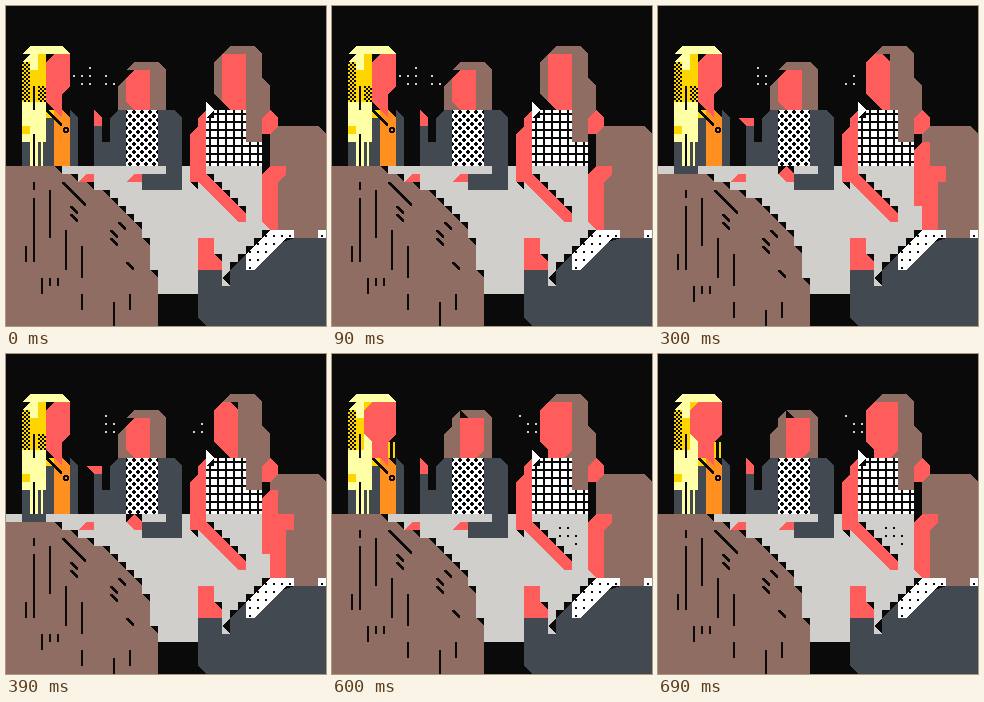
An HTML page that plays this animation: 320x320 px, repeating every 0.75 s.

```html
<!DOCTYPE html>
<html lang="en">
<head>
<meta charset="utf-8">
<title>Table talk</title>
<style>
  html, body { margin: 0; width: 100%; height: 100%; overflow: hidden; background: #0a0a0a; }
  svg { display: block; width: 100vw; height: 100vh; }
</style>
</head>
<body>
<svg id="stage" viewBox="0 0 320 320" shape-rendering="crispEdges">
  <defs>
    <pattern id="grid" width="8" height="8" patternUnits="userSpaceOnUse">
      <path fill="#fff" d="M0 0h8v8h-8z"/><path fill="#0a0a0a" d="M3 0h2v8h-2zM0 3h8v2h-8z"/>
    </pattern>
    <pattern id="lattice" width="8" height="8" patternUnits="userSpaceOnUse">
      <path fill="#fff" d="M0 0h8v8h-8z"/>
      <path fill="#0a0a0a" d="M3 4h2v1h1v2h-1v1h-2v-1h-1v-2h1zM0 0h1v1h1v2h-1v1h-1zM7 0h1v4h-1v-1h-1v-2h1z"/>
    </pattern>
    <pattern id="specks" width="8" height="8" patternUnits="userSpaceOnUse">
      <path fill="#fff" d="M0 0h8v8h-8z"/><path fill="#0a0a0a" d="M3 5h2v2h-2z"/>
    </pattern>
    <pattern id="check" width="4" height="4" patternUnits="userSpaceOnUse">
      <path fill="#ffd500" d="M0 0h4v4h-4z"/><path fill="#0a0a0a" d="M0 0h2v2h-2zM2 2h2v2h-2z"/>
    </pattern>
  </defs>
</svg>
<script>
const STEP = 150, STEPS = 5, T = 8;
const INK = '#0a0a0a', SKIN = '#ff5c5c', HAIR = '#8f6d62', TABLE = '#d0cfcb', COAT = '#434950',
      BLOND = '#ffffa6', GOLD = '#ffd500', ORANGE = '#ff9020', WHITE = '#fff';
const NS = 'http://www.w3.org/2000/svg';
const stage = document.getElementById('stage');
const parts = [];
let layer;

function add(fill, d) {
  const p = document.createElementNS(NS, 'path');
  p.setAttribute('fill', fill);
  p.setAttribute('d', d);
  layer.append(p);
}
// Starts a layer that is visible on the listed steps.
function on(steps, dy = 0) {
  layer = document.createElementNS(NS, 'g');
  if (dy) layer.setAttribute('transform', `translate(0 ${dy})`);
  stage.append(layer);
  parts.push([layer, steps]);
}
// Polygon in tile units: "x,y x,y ..."
const poly = (fill, pts) => add(fill, 'M' + pts.split(' ').map(p => p.split(',').map(n => n * T).join(' ')).join('L') + 'Z');
// Box in tile units with corners cut at 45 degrees: top left, top right, bottom right, bottom left.
const box = (fill, x, y, w, h, a = 0, b = 0, c = 0, d = 0) => poly(fill,
  `${x + a},${y} ${x + w - b},${y} ${x + w},${y + b} ${x + w},${y + h - c} ` +
  `${x + w - c},${y + h} ${x + d},${y + h} ${x},${y + h - d} ${x},${y + a}`);
// Half tile, upper right or upper left.
const wedge = (fill, x, y, left) => poly(fill, `${x},${y} ${x + 1},${y} ${left ? x : x + 1},${y + 1}`);
const strand = (x, y, n, fill = INK) => add(fill, `M${x * T + 3} ${y * T}h2v${n * T}h-2z`);
const slant = (x, y, n = 1) => add(INK,
  `M${x * T} ${y * T}h2l${n * T - 2} ${n * T - 2}v2h-2l${2 - n * T} ${2 - n * T}z`);
// A w by h block of specks, one in each tile.
function dots(fill, x, y, w = 1, h = 1) {
  for (let i = 0; i < w * h; i++)
    add(fill, `M${(x + i % w) * T + 3} ${(y + Math.floor(i / w)) * T + 5}h2v2h-2z`);
}
// One speck above two pairs; the pairs may drift sideways.
function puff(x, y, drift = 0) {
  dots(TABLE, x, y);
  dots(TABLE, x + drift, y + 1, 2, 2);
}

const ALL = '01234', REST = '0134', LEAN = '2', AWAY = '012', FRONT = '34';

on(ALL);
poly(TABLE, '0,20 33,20 33,28 27,34 28,35 24,36 19,36 0,36');

// Blonde woman
box(COAT, 2, 16, 7, 4);
box(COAT, 2, 20, 3, 1);
box(COAT, 8, 13, 1, 4, 0, 1);
box(COAT, 5, 13, 2, 3);
box(ORANGE, 6, 14, 2, 6);
poly(ORANGE, '6,13 7,13 8,14 6,14');
box(BLOND, 2, 5, 6, 1, 1, 1);
box(BLOND, 2, 6, 3, 11, 1);
box('url(#check)', 2, 7, 1, 5);
box(GOLD, 4, 6, 1, 4);
box(GOLD, 3, 8, 1, 4);
box(GOLD, 2, 15, 1, 1);
box(GOLD, 5, 13, 1, 1);
box(BLOND, 3, 12, 1, 8);
strand(3, 10, 3);
strand(3, 16, 4);
strand(4, 17, 3, BLOND);
on(AWAY);
box('url(#check)', 4, 10, 1, 2);
box(SKIN, 5, 6, 3, 5, 1, 0, 1);
box(SKIN, 5, 10, 2, 3, 0, 0, 0, 1);
on(FRONT);
box(SKIN, 4, 6, 4, 5, 1, 0, 1, 1);
box(SKIN, 5, 10, 2, 3);
for (const x of [55, 60]) add(GOLD, `M${x + 1} 88h2v16h-2z`);
on(ALL);
wedge(SKIN, 6, 13);
slant(5, 13, 2);
add(INK, 'M58 121h4v1h1v4h-1v1h-4v-1h-1v-4h1z');
add(ORANGE, 'M59 123h2v2h-2z');

// Middle woman
box(COAT, 13, 13, 2, 7, 1);
box(COAT, 11, 17, 2, 3);
box(COAT, 11, 15, 1, 2);
box(COAT, 19, 13, 1, 7);
box(COAT, 20, 13, 2, 10, 0, 1);
box(COAT, 17, 21, 3, 2);
box('url(#lattice)', 15, 13, 4, 7);
box(HAIR, 15, 7, 5, 6, 1, 1);
box(HAIR, 14, 9, 1, 4, 1);
on(AWAY);
wedge(INK, 15, 8, true);
box(SKIN, 15, 8, 3, 5, 1, 0, 0, 1);
on(FRONT);
box(SKIN, 16, 8, 3, 5, 0, 0, 1);
poly(INK, '16,7 17,8 16,8');
on(REST);
box(SKIN, 11, 13, 1, 2, 0, 1);
box(SKIN, 15, 21, 2, 1, 1);
on(LEAN);
box(SKIN, 10, 14, 2, 1, 0, 0, 0, 1);
wedge(INK, 15, 20, true);
wedge(INK, 16, 20);
poly(SKIN, '15,21 16,20 17,21 17,22 16,22');

// Woman in the checked top
on(ALL);
box('url(#grid)', 25, 13, 7, 7);
poly(WHITE, '25,12 26,13 26,14 25,14');
poly(INK, '26,13 26,14 25,14');
poly(SKIN, '23,16 24,15 24,14 25,13 25,21 30,26 30,27 29,27 24,22 23,22');
wedge(INK, 23, 22);
for (let i = 0; i < 5; i++) wedge(INK, 25 + i, 21 + i);
box(SKIN, 32, 13, 2, 3, 0, 1, 1);
box(HAIR, 27, 5, 5, 3, 1, 1);
box(HAIR, 29, 6, 3, 7);
box(HAIR, 30, 9, 3, 5, 0, 1, 1);
box(HAIR, 30, 13, 2, 4);
on('01');
box(HAIR, 26, 6, 1, 6, 1, 0, 0, 1);
box(SKIN, 27, 6, 3, 7, 0, 0, 0, 1);
on(LEAN);
box(SKIN, 26, 6, 3, 7, 1, 0, 0, 2);
wedge(INK, 28, 6);
on(FRONT);
box(SKIN, 26, 6, 4, 6, 1, 0, 0, 1);
box(SKIN, 27, 11, 3, 2, 0, 0, 1);

// Man on the right
on(ALL);
box(HAIR, 33, 15, 7, 5, 1, 1);
box(HAIR, 34, 20, 6, 9);
on(REST);
box(SKIN, 32, 20, 2, 8, 1, 0, 0, 1);
wedge(INK, 32, 20, true);
box(SKIN, 34, 20, 1, 2, 0, 0, 1);
on(LEAN);
box(SKIN, 32, 17, 2, 8, 1);
box(SKIN, 33, 20, 2, 8);
box(SKIN, 33, 20, 3, 2);
on(ALL);
poly(COAT, '24,33 27,33 27,35 28,35 28,33 30,31 36,29 40,29 40,40 25,40 24,39');
poly('url(#specks)', '33,28 36,28 36,29 35,29 31,33 30,33 30,31');
box('url(#specks)', 39, 28, 1, 1);
for (let i = 0; i < 5; i++) wedge(INK, 32 - i, 28 + i, true);
box(SKIN, 24, 29, 2, 4);
poly(SKIN, '26,31 27,32 27,33 26,33');
wedge(INK, 26, 31);

// Head in front: the hairline is a stair of half tiles.
function front() {
  const stair = [[6, 20], [8, 21], [10, 22], [12, 23], [13, 24], [14, 25], [15, 26], [16, 27], [17, 29], [18, 33]];
  const edge = stair.map(([x, y]) => `${x},${y} ${x + 1},${y + 1}`).join(' ');
  for (const [x, y] of stair) wedge(INK, x, y);
  poly(HAIR, `0,20 ${edge} 19,40 0,40`);
  strand(3, 22, 1);
  strand(3, 24, 8);
  strand(5, 23, 6);
  strand(2, 30, 2);
  strand(4, 34, 2);
  for (const x of [5, 6]) strand(x, 34, 1);
  strand(7, 28, 5);
  strand(9, 30, 4);
  strand(9, 36, 2);
  strand(13, 37, 3);
  strand(15, 36, 2);
  slant(7, 22, 3);
  for (const y of [25, 26]) slant(8, y);
  slant(14, 27);
  for (const y of [28, 29]) slant(13, y);
  slant(15, 32);
}
on(REST); front();
on(LEAN, T); front();
on(ALL);
box(SKIN, 9, 21, 2, 1, 1);

// Chatter
const chatter = [
  () => { dots(TABLE, 10, 7); dots(TABLE, 8, 8, 3); dots(TABLE, 9, 9, 2); dots(TABLE, 12, 8); dots(TABLE, 12, 9, 2); },
  () => { dots(TABLE, 9, 6, 1, 3); dots(TABLE, 8, 8); dots(TABLE, 14, 6); dots(TABLE, 12, 8); dots(TABLE, 11, 9, 3, 2); },
  () => { puff(12, 7); dots(TABLE, 24, 8); dots(TABLE, 23, 9, 2); },
  () => { puff(23, 7); dots(INK, 29, 21, 2, 3); },
  () => { puff(23, 7, 1); dots(INK, 28, 21, 2, 2); dots(INK, 30, 22, 1, 2); }
];
chatter.forEach((say, i) => { on(String(i)); say(); });

function draw() {
  const step = String(Math.floor(performance.now() / STEP) % STEPS);
  for (const [g, steps] of parts) g.style.display = steps.includes(step) ? '' : 'none';
  requestAnimationFrame(draw);
}
draw();
</script>
</body>
</html>
```
